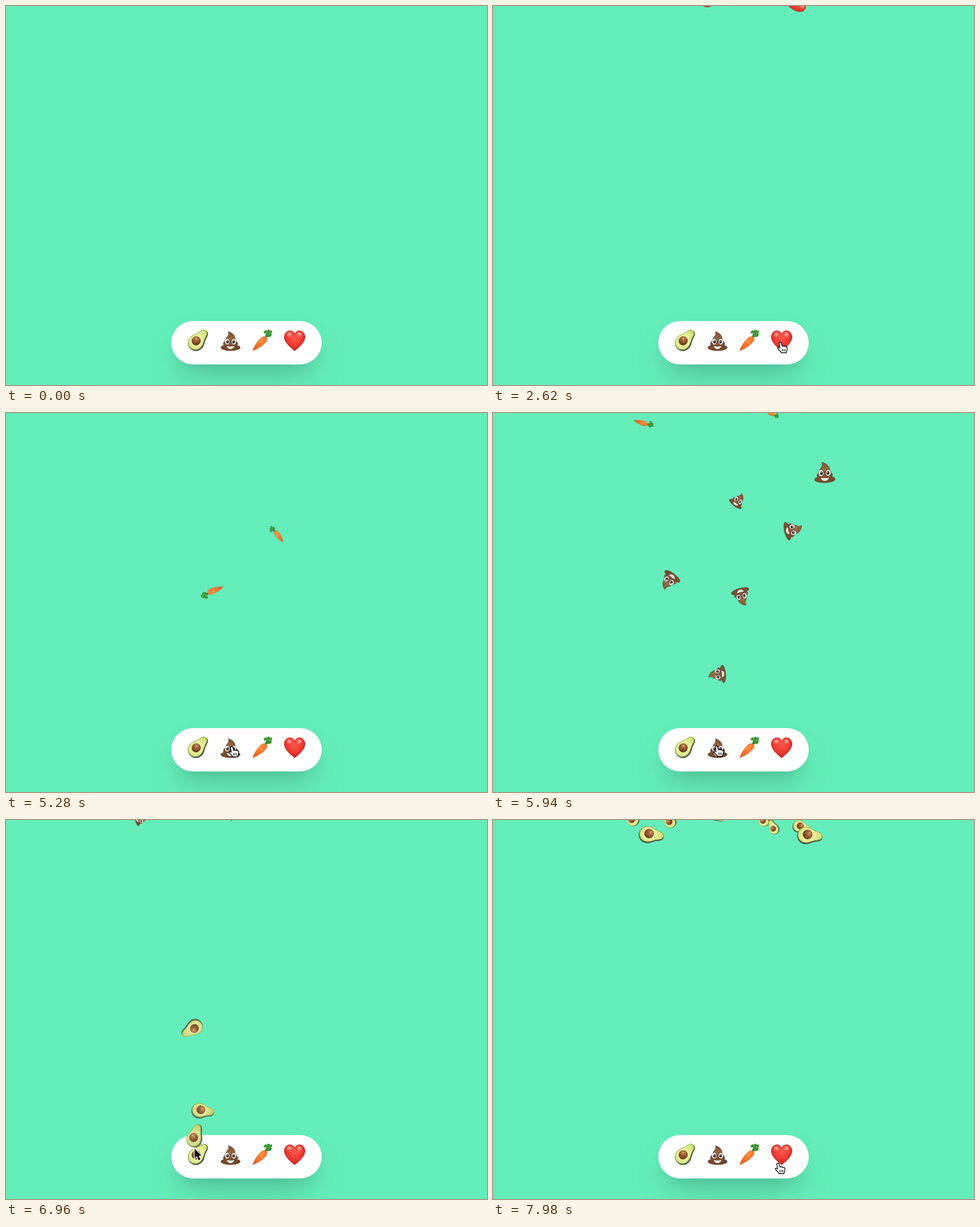
An HTML page with a canvas that plays this animation: 844x664 px, repeating every 8000 ms.

```html
<!DOCTYPE html>
<html lang="en">
<head>
<meta charset="utf-8">
<title>Emoji reactions</title>
<style>
  html, body { margin: 0; width: 100%; height: 100%; overflow: hidden; background: #64edba; }
  canvas, .bar { position: absolute; left: 0; top: 0; }
  .bar {
    left: 290px; top: 552px; width: 263.5px; height: 75.5px; border-radius: 38px; background: #fff;
    box-shadow: 0 30px 60px -12px rgba(0, 0, 0, .16), 0 18px 36px -18px rgba(0, 0, 0, .14);
  }
</style>
</head>
<body>
<div class="bar"></div>
<canvas width="844" height="664"></canvas>
<script>
const LOOP = 8000, LIFE = 1280, TAU = 365, END_Y = -40, SPIN = 465 * Math.PI / 180;
const ctx = document.querySelector('canvas').getContext('2d');

function shape(d, fill, stroke, width = 1) {
  const path = new Path2D(d);
  if (fill) { ctx.fillStyle = fill; ctx.fill(path); }
  if (stroke) { ctx.strokeStyle = stroke; ctx.lineWidth = width; ctx.stroke(path); }
}

function oval(x, y, rx, ry, fill, stroke, turn = 0) {
  ctx.beginPath();
  ctx.ellipse(x, y, rx, ry, turn, 0, 7);
  ctx.fillStyle = fill;
  ctx.fill();
  if (stroke) { ctx.strokeStyle = stroke; ctx.lineWidth = 0.6; ctx.stroke(); }
}

function glow(x, y, r, ...colors) {
  const g = ctx.createRadialGradient(x, y, 0, x, y, r);
  colors.forEach((c, i) => g.addColorStop(i / (colors.length - 1), c));
  return g;
}

function avocado() {
  const body = 'M0-22C5-22 7-18 8-12C9-6 14-2 14 6C14 14 8 20 0 20C-8 20-14 14-14 6C-14-2-9-6-8-12C-7-18-5-22 0-22Z';
  ctx.rotate(0.73);
  shape(body, '#4f5a49');
  ctx.save();
  ctx.translate(-1.5, -0.4);
  ctx.scale(0.9, 0.95);
  shape(body, glow(-1, 2, 23, '#f4f6b0', '#e6ee98', '#cade70'), '#93ac4c', 1);
  ctx.restore();
  oval(-2.4, 3, 7.6, 7.8, glow(-4.5, 0, 11, '#c58a58', '#965a32', '#64361b'), '#7d522b');
  oval(-5, 0, 1.8, 1.3, '#e0b58c99');
}

function poop() {
  const brown = glow(-3, -4, 25, '#966644', '#805234', '#6a4228'), edge = '#5f3c25';
  oval(0, 11.4, 17, 5.5, brown, edge);
  oval(0, 4.5, 12.7, 6.2, brown, edge);
  shape('M-8-3C-8-8-1-9-4-16.5C3-15 9-9 8-3C6 1-6 1-8-3Z', brown, edge, 0.6);
  shape('M-6-4.5Q1-4 6-7.5', null, '#a8754f', 1);
  for (const x of [-5.8, 5.8]) {
    oval(x, 1, 4.2, 5.3, '#fff', '#4a2c18');
    oval(x * 0.92, 1.2, 2.3, 3, '#2b211c');
    oval(x * 0.92 - 0.6, 0, 0.8, 0.9, '#fff');
  }
  shape('M-7 8.4Q0 10.4 7 8.4Q5 14.2 0 14.2Q-5 14.2-7 8.4Z', '#fff', edge, 0.5);
}

function carrot() {
  shape('M5-6L12-13M5-6L9-15M5-6L15-8', null, '#39852d', 2);
  for (const [x, y, r] of [[5, -15, 3], [10, -16, 3.2], [14.5, -15, 2.8], [9, -12, 3], [13.5, -10, 3], [10, -8, 2.2]]) {
    oval(x, y, r, r * 0.8, glow(x - 1, y - 1, 4, '#57b043', '#277b26'), null, -0.7);
  }
  shape('M-17 18C-15 11-9 1-2-5C3-9 9-6 8-1C6 6-7 14-17 18Z', glow(-3, -1, 21, '#ff9a48', '#f3752a', '#dc5719'), '#d75b1c', 0.6);
  shape('M-3-3L0-1M-8 3L-5 5M4 2L1 0M-4 9L-6 7', null, '#c9551b', 0.8);
}

function heart() {
  shape('M0 18C-6 13-18 4-18-6C-18-13-13-17-8.5-17C-5-17-1.5-15 0-11C1.5-15 5-17 8.5-17C13-17 18-13 18-6C18 4 6 13 0 18Z',
    glow(0, -5, 25, '#ff584c', '#ee3c33', '#bd201b'), '#bf241e', 1);
  for (const x of [-9.5, 8.5]) oval(x, -10, 6, 5, glow(x, -11, 6.5, '#ffd9d0cc', '#ff8f8000'), null, x < 0 ? -0.5 : 0.4);
}

const buttons = [[avocado, 337.5, 586], [poop, 394, 587], [carrot, 450, 586], [heart, 506.5, 586]];
const AVOCADO = 0, POOP = 1, CARROT = 2, HEART = 3;

// kind, launch time, sideways travel, final scale, spin direction
const flights = [
  [HEART, 1445, -142, 0.95, 1], [HEART, 1566, 27, 0.9, 1],
  [HEART, 2999, -154, 0.68, -1], [HEART, 3096, -24, 0.82, 1],
  [CARROT, 4949, 42, 0.55, 1], [CARROT, 5072, -204, 0.72, 1],
  [POOP, 5404, 244, 1.1, 1], [POOP, 5510, 53, 0.66, -1], [POOP, 5597, 218, 0.92, -1],
  [POOP, 5712, -184, 0.9, 1], [POOP, 5741, 101, 0.87, -1], [POOP, 5857, -4, 0.56, -1], [POOP, 5942, -167, 0.6, 1],
  [AVOCADO, 6802, -30, 0.9, -1], [AVOCADO, 6914, 57, 0.6, 1], [AVOCADO, 6942, -100, 0.75, -1],
  [AVOCADO, 6965, 145, 0.65, -1], [AVOCADO, 6980, -30, 0.7, -1], [AVOCADO, 7079, 169, 0.6, -1],
  [AVOCADO, 7079, 222, 0.75, 1], [AVOCADO, 7164, -68, 1.06, 1], [AVOCADO, 7172, 244, 1.07, 1],
];

// time, x, y of the pointer's hot spot
const route = [
  [340, 806, 543], [640, 489, 592], [840, 500, 601], [1260, 500, 601], [1400, 504, 589],
  [4660, 504, 589], [4880, 449, 583], [5080, 449, 583], [5280, 396, 584], [5600, 392, 583],
  [6400, 392, 583], [6700, 331, 576], [7200, 331, 576], [7700, 460, 606], [7960, 500, 601], [LOOP, 500, 601],
];

function place(draw, x, y, scale = 1, angle = 0, alpha = 1) {
  ctx.save();
  ctx.globalAlpha = alpha;
  ctx.translate(x, y);
  ctx.rotate(angle);
  ctx.scale(scale, scale);
  draw();
  ctx.restore();
}

function hand() {
  shape('M-2 1.5Q0-1 2 1.5L3.5 7Q5 5.5 6.5 7.2Q8 6 9.3 7.8Q11.5 7 12.2 9.5C13 13 11 15 10.5 18.5H2C1 16-3 13-4.6 10.5Q-4.5 8-.8 10Z', '#fff', '#000', 1.3);
  shape('M3.5 12V16M6 12V16M8.5 12V16', null, '#000', 1);
}

function arrow() {
  const outline = 'M0 0V16.5L4 13L7 20L10 18.7L7 12H12Z';
  shape(outline, null, '#fff', 2.4);
  shape(outline, '#000');
}

function drawPointer(t) {
  const next = route.findIndex(p => p[0] > t);
  if (next < 1) return;
  const [t0, x0, y0] = route[next - 1], [t1, x1, y1] = route[next];
  const u = (t - t0) / (t1 - t0), k = u * u * (3 - 2 * u);
  const x = x0 + (x1 - x0) * k, y = y0 + (y1 - y0) * k;
  const overButton = buttons.some(b => Math.abs(x - b[1]) < 24 && Math.abs(y - b[2]) < 26);
  const covered = flights.some(f => t >= f[1] && t - f[1] < 50);
  place(overButton && !covered ? hand : arrow, x, y);
}

function render(now) {
  const t = now % LOOP;
  ctx.clearRect(0, 0, 844, 664);
  for (const b of buttons) place(...b);
  for (const [kind, start, dx, size, dir] of flights) {
    const age = t - start;
    if (age < 0 || age > LIFE) continue;
    const [draw, x, y] = buttons[kind];
    const k = 1 - Math.exp(-age / TAU);
    place(draw, x + dx * k, y + (END_Y - y) * k, 1 + (size - 1) * k, dir * SPIN * k, 0.88 + 0.12 * k);
  }
  drawPointer(t);
  requestAnimationFrame(() => render(performance.now()));
}
render(performance.now());
</script>
</body>
</html>
```
